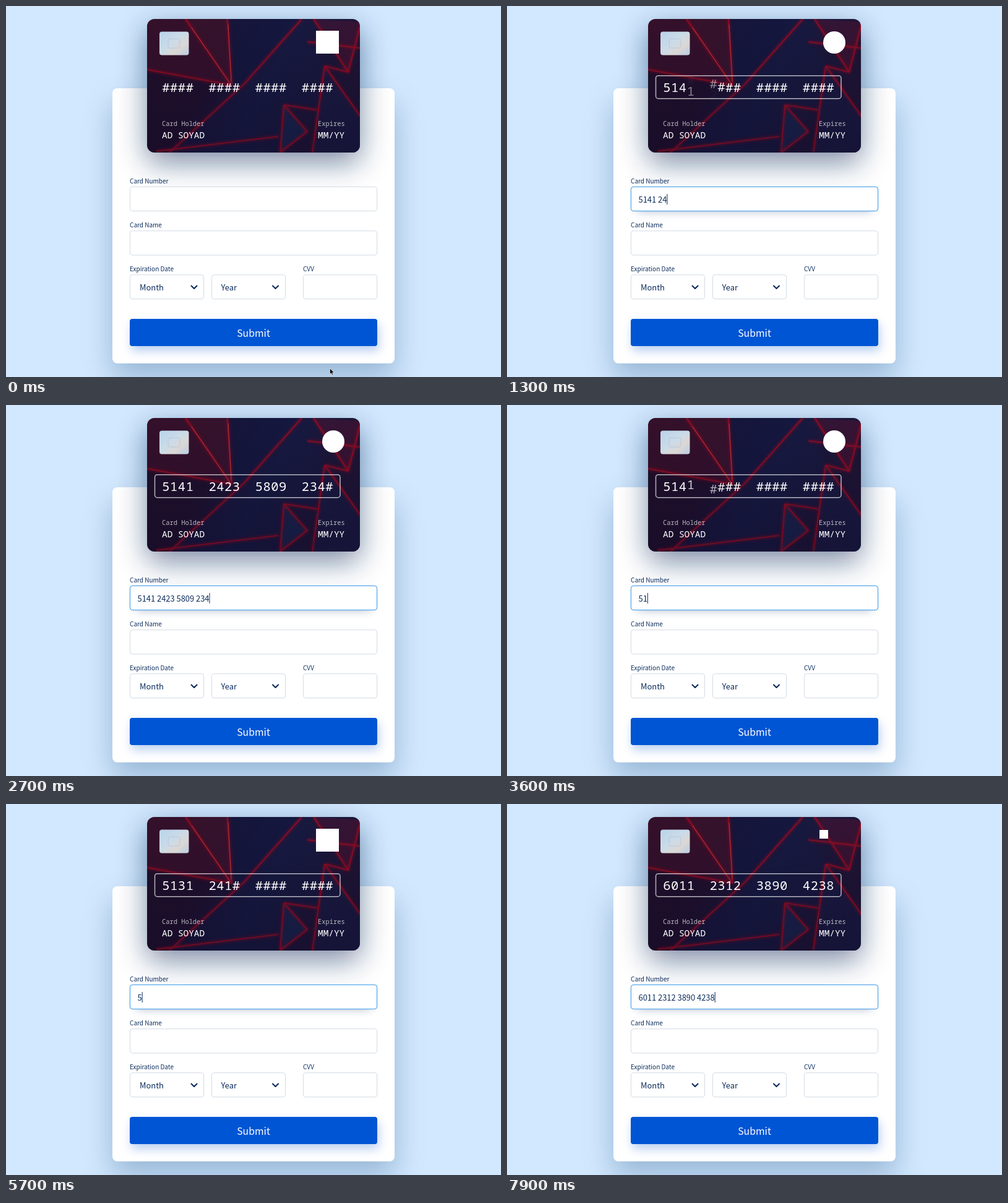
An HTML page for the animation above (8000 ms loop, 800x600 px).

```html
<!DOCTYPE html>
<html lang="en">
<head>
<meta charset="utf-8">
<title>Card form</title>
<style>
html, body { margin: 0; width: 100%; height: 100%; overflow: hidden; background: #d2e8fe; }
svg { display: block; width: 800px; height: 600px; }
text { font-family: "Noto Sans CJK JP", "Noto Sans CJK SC", "Noto Sans", sans-serif; font-weight: 500; fill: #0b2c5c; white-space: pre; }
.label { font-size: 10px; }
.value { font-size: 12.9px; }
.mono, .mono text { font-family: "Noto Sans Mono", "DejaVu Sans Mono", monospace; fill: #fff; }
.field { fill: #fff; stroke: #ced6e0; stroke-width: .9; }
.chevron { fill: none; stroke: #0b2c5c; stroke-width: 2.1; stroke-linecap: round; stroke-linejoin: round; }
</style>
</head>
<body>
<svg viewBox="0 0 800 600">
  <defs>
    <filter id="soft" x="-50%" y="-50%" width="200%" height="200%"><feGaussianBlur stdDeviation="24"/></filter>
    <filter id="near" x="-20%" y="-100%" width="140%" height="300%"><feGaussianBlur stdDeviation="8"/></filter>
    <filter id="glow" filterUnits="userSpaceOnUse" x="220" y="10" width="360" height="240"><feGaussianBlur stdDeviation="2.2"/></filter>
    <linearGradient id="night" x2="1" y2=".35">
      <stop stop-color="#24122a"/><stop offset=".4" stop-color="#21122f"/>
      <stop offset=".65" stop-color="#1a1c43"/><stop offset="1" stop-color="#211636"/>
    </linearGradient>
    <linearGradient id="shade" x2="0" y2="1">
      <stop stop-color="#06021d" stop-opacity=".1"/><stop offset="1" stop-color="#06021d" stop-opacity=".3"/>
    </linearGradient>
    <linearGradient id="foil" x2="1" y2="1">
      <stop stop-color="#b9d3ea"/><stop offset=".45" stop-color="#cbdbe8"/>
      <stop offset=".7" stop-color="#dcd7d4"/><stop offset="1" stop-color="#b8cde2"/>
    </linearGradient>
    <clipPath id="cardClip"><rect x="228" y="21" width="344" height="216" rx="12"/></clipPath>
    <path id="veins" d="M290 21L364 128L228 103M358 21L365 128M478 21L384 127L264 237M243 235L440 211
      M449 160L487 203L443 237M449 160L443 237M449 160L502 168M497 21L553 107L574 26M487 58L572 68
      M515 97L495 237M515 97L574 180M553 107L515 97"/>
  </defs>

  <rect x="172" y="157" width="456" height="445" rx="8" fill="#46739f" opacity=".42" filter="url(#soft)"/>
  <rect x="172" y="133" width="456" height="445" rx="8" fill="#fff"/>
  <rect x="228" y="37" width="344" height="216" rx="12" fill="#0e2a5a" opacity=".55" filter="url(#soft)"/>

  <g clip-path="url(#cardClip)">
    <rect x="228" y="21" width="344" height="216" fill="url(#night)"/>
    <path d="M228 21H290L364 128L228 103Z" fill="#8a1530" opacity=".22"/>
    <path d="M290 21H358L365 128Z" fill="#a02030" opacity=".2"/>
    <path d="M358 21H478L384 127H365Z" fill="#141b45" opacity=".7"/>
    <path d="M384 127L264 237H440L449 160L502 168L515 97L478 21Z" fill="#191c45" opacity=".55"/>
    <path d="M449 160L487 203L443 237Z" fill="#1b2c58" opacity=".7"/>
    <path d="M497 21L553 107L574 26Z" fill="#641331" opacity=".4"/>
    <path d="M515 97L574 180V237H495Z" fill="#1b1e49" opacity=".7"/>
    <g fill="none" stroke-linejoin="round">
      <use href="#veins" stroke="#a80822" stroke-width="5" opacity=".5" filter="url(#glow)"/>
      <use href="#veins" stroke="#b00b20" stroke-width="1.6" opacity=".85"/>
      <path d="M300 35L362 125M359 30L364 122" stroke="#e06058" stroke-width="1" opacity=".6"/>
    </g>
    <rect x="228" y="21" width="344" height="216" fill="url(#shade)"/>
  </g>
  <rect x="248" y="41.5" width="47.500" height="38" rx="4" fill="url(#foil)"/>
  <rect x="262" y="53" width="19" height="15" rx="3" fill="none" stroke="#a9bfd6" opacity=".6"/>
  <g id="emblem" fill="#fff">
    <rect x="501" y="40" width="37" height="37"/>
    <circle cx="529" cy="59" r="18"/>
    <rect x="505" y="42" width="14" height="14"/>
  </g>
  <g class="mono">
    <g id="digits" font-size="20.500" text-anchor="middle"></g>
    <g font-size="10.400" opacity=".7"><text x="252" y="194" style="font-weight:400">Card Holder</text><text x="504" y="194" style="font-weight:400">Expires</text></g>
    <g font-size="14.400"><text x="252" y="213.500">AD SOYAD</text><text x="504" y="213.500">MM/YY</text></g>
  </g>
  <rect id="outline" fill="none" stroke="#fff" stroke-opacity=".68" stroke-width="1.500"/>

  <g class="label">
    <text class="label" x="200" y="286.500">Card Number</text>
    <text class="label" x="200" y="357.500">Card Name</text>
    <text class="label" x="200" y="429">Expiration Date</text>
    <text class="label" x="480" y="429">CVV</text>
  </g>
  <rect id="lift" x="211" y="311" width="378" height="19" fill="#203875" filter="url(#near)"/>
  <g class="field">
    <rect x="200.400" y="292.400" width="399.200" height="39.200" rx="4"/>
    <rect x="200.400" y="363.700" width="399.200" height="39.200" rx="4"/>
    <rect x="200.400" y="434.700" width="119.200" height="39.200" rx="4"/>
    <rect x="332.400" y="434.700" width="119.200" height="39.200" rx="4"/>
    <rect x="480.400" y="434.700" width="119.200" height="39.200" rx="4"/>
  </g>
  <rect id="ring" x="200.400" y="292.400" width="399.200" height="39.200" rx="4" fill="none" stroke="#3d9cec"/>
  <text id="entry" class="value" x="212.500" y="317.500"></text>
  <rect id="caret" y="304" width="1" height="17" fill="#0b2c5c"/>
  <text class="value" x="216" y="459.700">Month</text>
  <text class="value" x="347.500" y="459.700">Year</text>
  <path class="chevron" d="M299.500 452.500L304 457L308.500 452.500M431 452.500L435.500 457L440 452.500"/>

  <rect x="202.500" y="514" width="400" height="44" rx="4" fill="#2364d2" opacity=".3" filter="url(#near)"/>
  <rect x="200" y="506" width="400" height="44" rx="4" fill="#0055d4"/>
  <text x="400" y="534.700" text-anchor="middle" style="font-size:15.800px;fill:#fff;font-weight:400">Submit</text>
  <path id="pointer" d="M0 0V9.500L2.200 7.500L3.700 10.800L5.300 10L3.800 6.900H6.700Z" fill="#000" stroke="#fff" stroke-width=".6"/>
</svg>
<script>
const LOOP = 8000, FOCUS = 400, SHIFT = 12;
const $ = id => document.getElementById(id);
const clamp = v => Math.min(1, Math.max(0, v));
const smooth = v => (v = clamp(v), v * v * (3 - 2 * v));
const mix = (a, b, p) => a + (b - a) * p;

// Every edit of the number field: [time, digits]
const edits = [[0, '']];
let digits = '';
const set = (time, text) => edits.push([time, digits = text]);
const type = (text, start, step) => [...text].forEach((c, i) => set(start + i * step, digits + c));
const erase = (count, start, step) => {
  for (let i = 0; i < count; i++) set(start + i * step, digits.slice(0, -1));
};
type('514124235809234', 785, 98);
erase(11, 2740, 61);
erase(3, 3525, 70);
type('131241', 4100, 150);
set(5695, '5');
set(5850, '');
type('6011231238904238', 6110, 98);

// Each slot holds its successive characters: [time, character]
const slots = Array.from({ length: 16 }, (_, i) => {
  const changes = [];
  for (const [time, text] of edits) {
    const c = text[i] || '#';
    if (!changes.length || changes.at(-1)[1] !== c) changes.push([time, c]);
  }
  const glyphs = [0, 1].map(() => {
    const g = document.createElementNS('http://www.w3.org/2000/svg', 'text');
    g.setAttribute('x', 258.4 + i * 12.8 + Math.floor(i / 4) * 24);
    return $('digits').appendChild(g);
  });
  return { changes, glyphs };
});

function put(glyph, char, dy, alpha) {
  glyph.textContent = char;
  glyph.setAttribute('y', 138.8 + dy);
  glyph.setAttribute('opacity', alpha);
}

function drawSlot({ changes, glyphs }, t) {
  const k = changes.findLastIndex(c => c[0] <= t);
  const [time, char] = changes[k];
  const out = k ? smooth((t - time) / 250) : 1;
  const enter = k ? smooth((t - time - 100) / 250) : 1;
  put(glyphs[0], k ? changes[k - 1][1] : '', -SHIFT * out, 1 - out);
  put(glyphs[1], char, SHIFT * (1 - enter), enter);
}

function emblemFor(text) {
  if (/^5[1-5]/.test(text)) return 1;
  return /^6011/.test(text) ? 2 : 0;
}

function draw(t) {
  const text = edits.findLast(e => e[0] <= t)[1];
  slots.forEach(s => drawSlot(s, t));
  [...$('emblem').children].forEach((e, i) => e.setAttribute('opacity', +(i === emblemFor(text))));

  const focus = smooth((t - FOCUS) / 350);
  const box = { x: mix(228, 240.5, focus), y: mix(21, 112.7, focus), width: mix(344, 299.5, focus),
    height: mix(216, 37, focus), rx: mix(12, 4, focus), opacity: focus };
  for (const key in box) $('outline').setAttribute(key, box[key]);
  $('ring').setAttribute('opacity', focus);
  $('lift').setAttribute('opacity', .45 * focus);

  const entry = $('entry');
  entry.textContent = text.replace(/(.{4})(?=.)/g, '$1 ');
  $('caret').setAttribute('x', 212.5 + (text ? entry.getComputedTextLength() : 0));
  $('caret').setAttribute('opacity', +(t >= FOCUS));

  const move = smooth((t - 100) / 300);
  $('pointer').setAttribute('transform', `translate(${mix(523.5, 450, move)} ${mix(586, 318, move)})`);
  $('pointer').setAttribute('opacity', +(t < FOCUS));
}

const start = performance.now();
function frame() {
  draw((performance.now() - start) % LOOP);
  requestAnimationFrame(frame);
}
frame();
</script>
</body>
</html>
```
